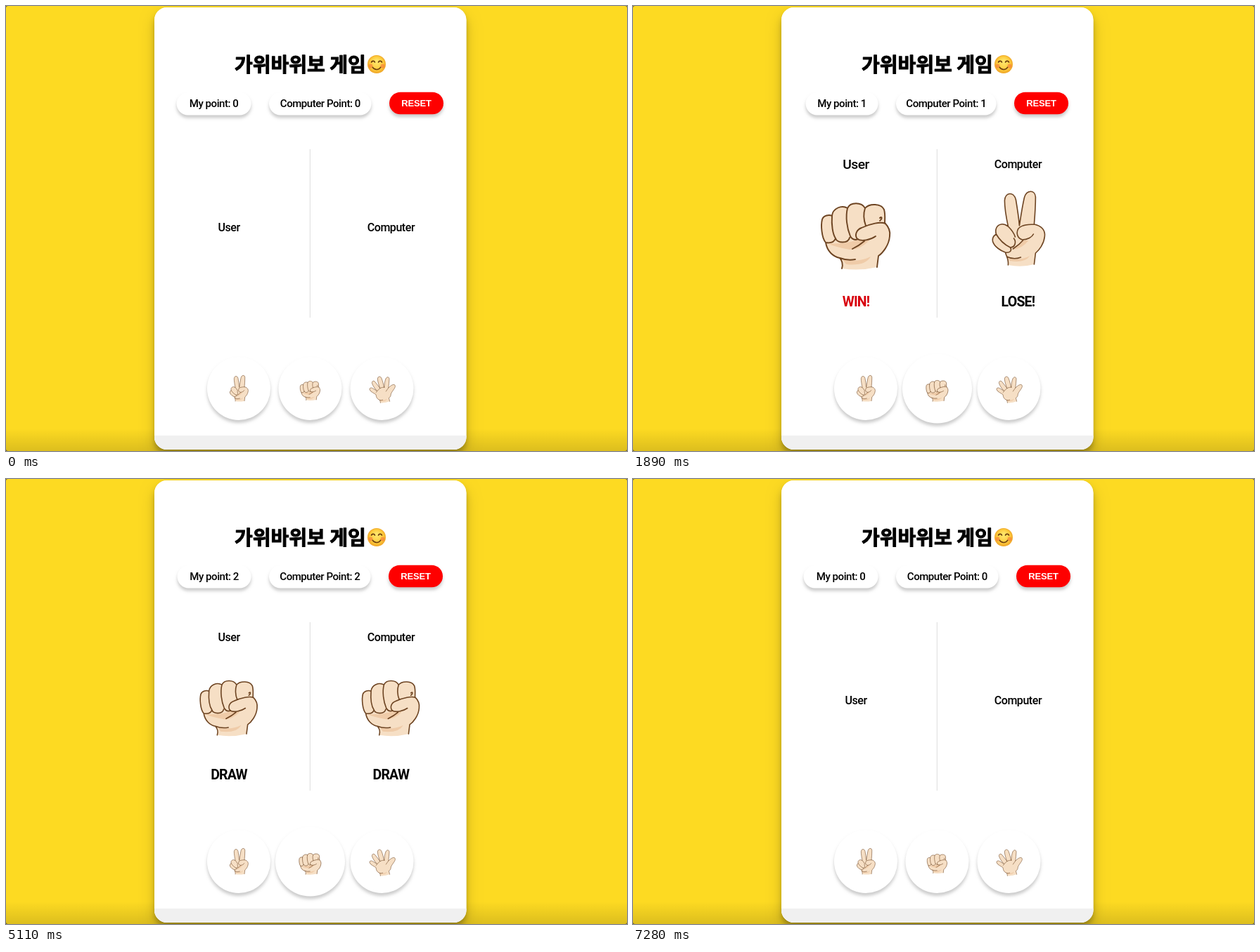
Animation, 883 px wide and 634 px high, one loop 7350 ms. Source, as an HTML page with a canvas:

```html
<!DOCTYPE html>
<html lang="ko">
<head>
<meta charset="utf-8">
<title>가위바위보 게임</title>
<style>
  html, body { margin: 0; width: 100%; height: 100%; overflow: hidden; background: #fdda22; }
  canvas { display: block; }
</style>
</head>
<body>
<canvas id="stage" width="883" height="634"></canvas>
<script>
const ctx = document.getElementById('stage').getContext('2d');
const LOOP = 7350, STEP = 70, FADE = 200;
const BODY = 'Roboto, Lato, sans-serif';
const MID = 317, HAND_Y = 319, COMPUTER_DX = 230.4;

// Hands share the centre (MID, HAND_Y); k brings each drawing to its resting size.
const hands = {
  scissors: hand(1,
    'M303 369C304 361 301 358 299 351C293 349 283 343 281 335C280 330 283 327 286 325' +
    'C284 318 287 312 293 311C297 310 300 312 303 314C300 300 298 288 298 277' +
    'C299 265 311 264 314 276C316 288 318 300 319 313C321 300 323 286 326 273' +
    'C329 262 341 261 342 272C342 286 341 299 340 311C351 313 356 320 355 328' +
    'C354 339 347 348 342 352L340 368', 'Q322 373 303 369',
    'M309 347Q318 341 325 334L332 334Q323 346 309 347ZM302 358Q318 364 334 356Q326 367 305 363Z',
    'M286 325C291 334 300 341 306 344C313 344 315 336 311 331M303 314C306 317 311 322 313 329' +
    'M299 351C305 352 309 349 306 344M340 311C330 311 320 313 317 318C314 325 317 331 323 333' +
    'C331 333 337 329 339 325M325 333Q319 340 310 346M301 357Q311 362 321 358'),
  rock: hand(1 / 1.2,
    'M297 374C299 368 297 362 294 359C284 357 276 349 274 337C268 330 267 312 269 304' +
    'C271 298 279 297 283 299C284 288 297 283 305 288C309 279 325 279 330 288' +
    'C336 281 353 281 357 290C359 297 358 304 358 309C364 315 366 322 365 328' +
    'C364 341 355 352 349 356L347 372', 'Q322 378 297 374',
    'M275 338Q300 340 320 333L336 334Q322 348 308 347Q290 344 275 338ZM298 361Q320 366 338 357Q330 371 303 368Z',
    'M283 299C282 312 284 325 288 331M274 337C280 338 286 337 288 331M305 288C302 300 304 316 309 328' +
    'M288 331C290 338 306 339 308 330M330 288C327 297 328 305 331 313M309 328Q313 335 320 332' +
    'M359 310C352 307 338 310 325 316C317 319 315 327 319 332C325 336 338 333 345 328' +
    'M329 335Q322 341 312 346M351 306C355 303 354 299 351 302M294 359Q305 363 316 361'),
  paper: hand(1 / 1.2,
    'M310 387L307 374C294 370 289 360 288 347C280 340 263 335 258 324C254 315 264 311 272 316' +
    'L293 329C283 318 272 303 269 292C267 281 277 276 284 285L308 316C302 300 296 283 296 270' +
    'C297 257 310 255 315 267C320 280 325 296 328 312C329 297 331 281 336 269' +
    'C341 258 352 260 353 270C353 284 350 299 349 314C356 306 366 299 373 298' +
    'C382 297 384 306 379 315C373 325 365 334 361 344C361 354 357 360 351 363L355 380',
    'Q333 389 310 387',
    'M308 374Q328 377 343 368Q336 381 311 380Z',
    'M289 336C296 326 302 320 309 316C317 311 323 311 330 311M349 314C345 319 341 325 337 331' +
    'M307 374Q314 376 321 373')
};

// time, my points, computer points, my hand, computer hand, outcome for me
const rounds = [
  [0, 0, 0],
  [700, 0, 1, 'scissors', 'rock', -1],
  [1890, 1, 1, 'rock', 'scissors', 1],
  [3220, 2, 1, 'paper', 'rock', 1],
  [4200, 2, 2, 'paper', 'scissors', -1],
  [5110, 2, 2, 'rock', 'rock', 0],
  [6580, 0, 0]
];

const buttons = [
  { name: 'scissors', x: 331, hover: [[340, 1150]] },
  { name: 'rock', x: 432.5, hover: [[1150, 1240], [1500, 2540], [4850, 5690]] },
  { name: 'paper', x: 534.5, hover: [[1240, 1500], [2540, 4850]] }
];
const resetHover = [[6110, 7090]];

function hand(k, edge, base, shade, lines) {
  return {
    k, fill: new Path2D(edge + base + 'Z'), shade: new Path2D(shade),
    ink: new Path2D(edge + lines)
  };
}

// Same curve as the CSS "ease" keyword.
function ease(p) {
  if (p <= 0) return 0;
  if (p >= 1) return 1;
  const bez = (u, a, b) => 3 * u * (1 - u) * ((1 - u) * a + u * b) + u ** 3;
  let lo = 0, hi = 1;
  for (let i = 0; i < 20; i++) {
    const u = (lo + hi) / 2;
    if (bez(u, .25, .25) < p) lo = u; else hi = u;
  }
  return bez(lo, .1, 1);
}

function hoverLevel(t, spans) {
  let level = 0;
  for (const [from, to] of spans) {
    const up = ease((Math.min(t, to) - from) / FADE);
    level = Math.max(level, up * (1 - ease((t - to) / FADE)));
  }
  return level;
}

function scaled(x, y, s, draw) {
  ctx.save();
  ctx.translate(x, y);
  ctx.scale(s, s);
  draw();
  ctx.restore();
}

function shadow(y, blur, alpha) {
  ctx.shadowColor = `rgba(0,0,0,${alpha})`;
  ctx.shadowOffsetY = y;
  ctx.shadowBlur = blur;
}

function box(x, y, w, h, r, color) {
  ctx.fillStyle = color;
  ctx.beginPath();
  ctx.roundRect(x, y, w, h, r);
  ctx.fill();
}

function raisedBox(x, y, w, h, r, color) {
  ctx.save();
  shadow(4, 4, .2);
  box(x, y, w, h, r, color);
  ctx.restore();
}

function text(str, x, y, font, color = '#000', spacing = 0, align = 'center') {
  ctx.font = font;
  ctx.letterSpacing = spacing + 'px';
  ctx.textAlign = align;
  ctx.fillStyle = color;
  ctx.fillText(str, x, y);
}

function drawHand(name, x, y, s) {
  const h = hands[name];
  scaled(x, y, s * h.k, () => {
    ctx.translate(-MID, -HAND_Y);
    ctx.fillStyle = '#f6dfc5';
    ctx.fill(h.fill);
    ctx.fillStyle = '#efcba8';
    ctx.fill(h.shade);
    ctx.strokeStyle = '#6d4422';
    ctx.lineWidth = 1.6 / h.k;
    ctx.lineJoin = ctx.lineCap = 'round';
    ctx.stroke(h.ink);
  });
}

function arc(x, y, r, from, to) {
  ctx.beginPath();
  ctx.arc(x, y, r, from * Math.PI, to * Math.PI);
}

function drawSmile(x, y) {
  scaled(x, y, 1, () => {
    const g = ctx.createRadialGradient(0, -4, 2, 0, 0, 13.5);
    g.addColorStop(0, '#ffe468');
    g.addColorStop(.65, '#fdcb3c');
    g.addColorStop(1, '#eda024');
    ctx.fillStyle = g;
    arc(0, 0, 13, 0, 2);
    ctx.fill();
    ctx.strokeStyle = '#6b3d10';
    ctx.lineCap = 'round';
    ctx.lineWidth = 1.7;
    for (const side of [-1, 1]) {
      ctx.fillStyle = 'rgba(245,112,60,.55)';
      arc(side * 8.5, 2.5, 3, 0, 2);
      ctx.fill();
      arc(side * 5, -2, 2.6, 1.12, 1.88);
      ctx.stroke();
    }
    arc(0, 1, 6.5, .17, .83);
    ctx.stroke();
  });
}

function drawPage() {
  box(0, 0, 883, 634, 0, '#6b6024');
  box(0, 0, 883, 634, 3, '#fdda22');
  const g = ctx.createLinearGradient(0, 602, 0, 634);
  g.addColorStop(0, 'rgba(0,0,0,0)');
  g.addColorStop(1, 'rgba(0,0,0,.13)');
  box(0, 602, 883, 32, 0, g);

  ctx.save();
  shadow(10, 20, .19);
  box(211, 2, 443.5, 630, 18, '#fff');
  shadow(6, 6, .2);
  box(211, 2, 443.5, 630, 18, '#fff');
  ctx.restore();
  box(211, 612, 443.5, 20, [0, 0, 18, 18], '#f0f0f0');

  const title = '가위바위보 게임';
  text(title, 325, 94, '900 28px "Noto Sans CJK KR", "Noto Sans CJK", sans-serif', '#000', 0, 'left');
  ctx.lineWidth = 1;
  ctx.lineJoin = 'round';
  ctx.strokeStyle = '#000';
  ctx.strokeText(title, 325, 94);
  drawSmile(527, 83);
  box(431.8, 204, 1, 240, 0, '#dcdcdc');
}

function drawScores(t, mine, theirs) {
  const narrow = [0, 3, 1], gap = 25.5, resetW = 77;
  const myW = 106 - narrow[mine], theirW = 145.5 - narrow[theirs];
  let x = 432.3 - (myW + theirW + resetW + 2 * gap) / 2;
  for (const [label, w] of [['My point: ' + mine, myW], ['Computer Point: ' + theirs, theirW]]) {
    raisedBox(x, 123, w, 32.5, 16.2, '#fff');
    text(label, x + w / 2, 144, '500 15px ' + BODY, '#000', -.45);
    x += w + gap;
  }
  const level = hoverLevel(t, resetHover);
  const over = resetHover.some(([a, b]) => t >= a && t < b);
  scaled(x + resetW / 2, 138.5, 1 + .1 * level, () => {
    raisedBox(-resetW / 2, -15.8, resetW, 31.6, 15.8, over ? '#c80000' : '#fe0000');
    text('RESET', 0, 4.6, 'bold 13px "Liberation Sans", Arial, sans-serif', '#fff', -.15);
  });
}

function drawPlayer(label, x, choice, outcome) {
  const s = outcome > 0 ? 1.2 : 1;
  scaled(x, choice ? 225.5 : 315.5, s, () => text(label, 0, 5.5, '500 16px ' + BODY, '#000', -.45));
  if (!choice) return;
  drawHand(choice, x, HAND_Y, s);
  const word = outcome > 0 ? 'WIN!' : outcome < 0 ? 'LOSE!' : 'DRAW';
  text(word, x, 427.5, 'bold 19.5px ' + BODY, outcome > 0 ? '#d8000c' : '#000', -.8);
}

function drawButton(t, { name, x, hover }) {
  scaled(x, 545, 1 + .1 * hoverLevel(t, hover), () => {
    raisedBox(-45, -45, 90, 90, 45, '#fff');
    drawHand(name, 0, .5, .35);
  });
}

function render(t) {
  const [, mine, theirs, my, their, outcome] = rounds.filter(r => r[0] <= t).pop();
  drawPage();
  drawScores(t, mine, theirs);
  drawPlayer('User', MID, my, outcome);
  drawPlayer('Computer', MID + COMPUTER_DX, their, -outcome);
  buttons.forEach(b => drawButton(t, b));
}

const start = performance.now();
function tick() {
  const t = (performance.now() - start) % LOOP;
  render(Math.floor(t / STEP) * STEP);
  requestAnimationFrame(tick);
}
tick();
</script>
</body>
</html>
```
